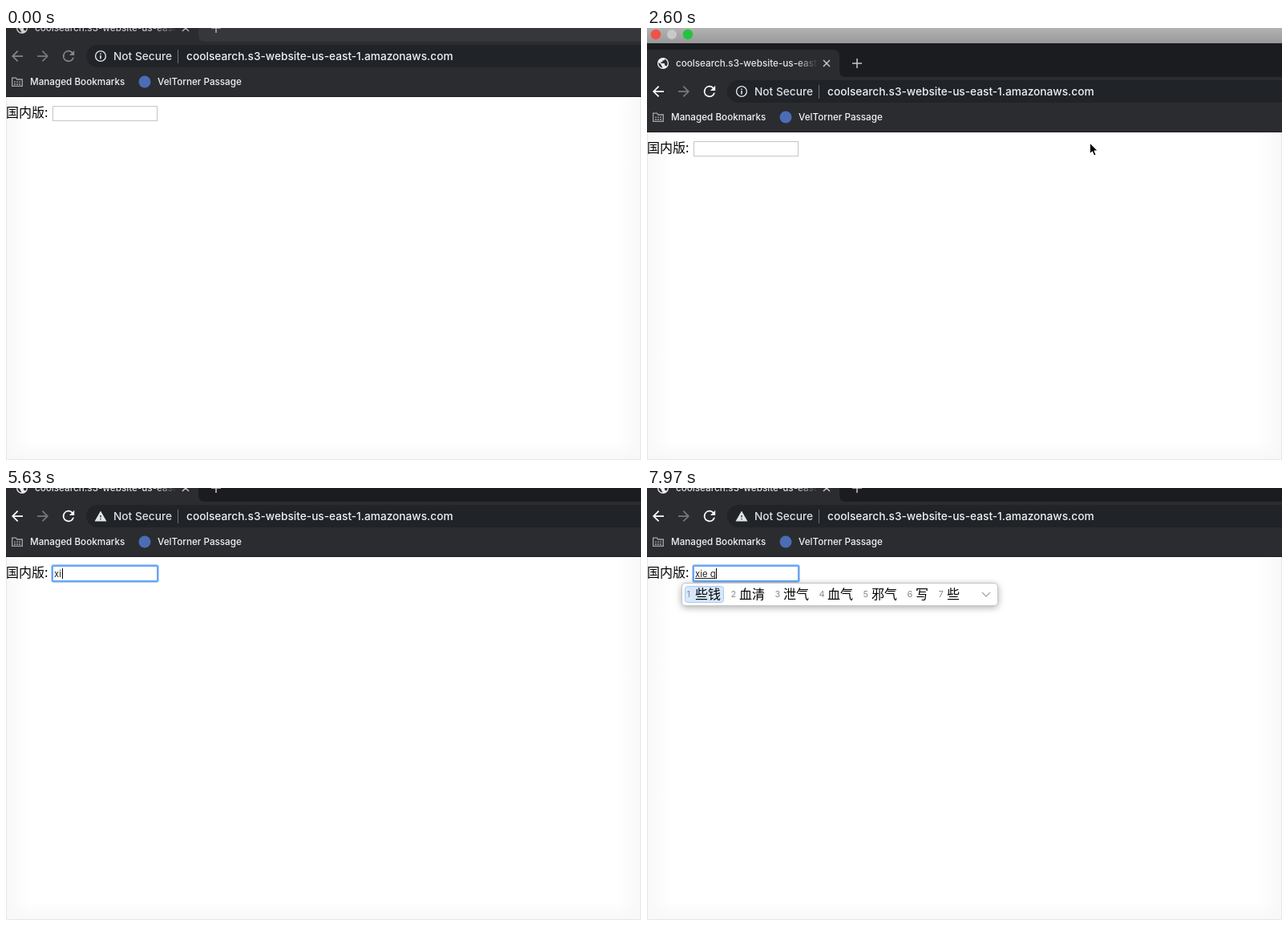
Recreate the animation shown at these times as an HTML page. Size 792 by 538 pixels, loop 8 s.

```html
<!DOCTYPE html>
<html lang="zh-CN">
<head>
<meta charset="utf-8">
<title>Search</title>
<style>
html, body { margin: 0; width: 100%; height: 100%; overflow: hidden; background: #fff; }
svg { display: block; width: 792px; height: 538px; }
text { font-family: Inter, Roboto, sans-serif; white-space: pre; }
.cjk { font-family: "Noto Sans CJK SC", "Noto Sans CJK", sans-serif; font-size: 16px; font-weight: 500; }
.small { font-size: 11.7px; font-weight: 500; }
.url { font-size: 13.7px; font-weight: 500; }
.line { fill: none; stroke-linecap: butt; }
#popup { filter: drop-shadow(0 2px 4px rgba(0, 0, 0, .32)); }
</style>
</head>
<body>
<svg viewBox="0 0 792 538">
  <defs>
    <linearGradient id="bar" x2="0" y2="1">
      <stop stop-color="#b2b2b2"/><stop offset="1" stop-color="#999"/>
    </linearGradient>
    <linearGradient id="edge">
      <stop stop-color="#f8f8f8"/><stop offset="1" stop-color="#f8f8f8" stop-opacity="0"/>
    </linearGradient>
    <linearGradient id="fade" gradientUnits="userSpaceOnUse" x1="186" x2="213" y1="0" y2="0">
      <stop stop-color="#e4e5e8"/><stop offset="1" stop-color="#e4e5e8" stop-opacity="0"/>
    </linearGradient>
  </defs>

  <rect width="792" height="538" fill="#fff"/>
  <g fill="url(#edge)">
    <rect width="30" height="538"/>
    <rect width="30" height="538" transform="translate(792) scale(-1 1)"/>
    <rect width="24" height="792" transform="translate(0 538) rotate(-90)"/>
  </g>
  <path class="line" d="M.5 0V537.5H791.5V0" stroke="#e6e6e6"/>

  <g id="window">
    <text class="cjk" y="111">国内版:</text>
    <rect x="58.5" y="97.5" width="130" height="18" fill="#fff" stroke="#c6c6c6"/>
    <g id="ring" class="line">
      <rect x="57" y="96" width="133" height="21" rx="2.5" stroke="#a9cdfa" stroke-width="2"/>
      <rect x="58" y="97" width="131" height="19" rx="1" stroke="#69a7f3" stroke-width="2"/>
    </g>
    <text id="typed" x="60" y="111" font-size="11.3" fill="#222"></text>
    <path id="under" class="line" stroke="#222"/>
    <rect id="caret" y="100" width="1" height="13"/>

    <rect id="strip" y="-60" width="792" height="80"/>
    <path d="M-10 17V-17H232q8 0 8 8V9q0 8 8 8H792V86H0V17z" fill="#2b2c30"/>
    <rect y="85" width="792" height="1" fill="#1c1d20"/>
    <rect x="100" y="21" width="720" height="28" rx="14" fill="#202327"/>

    <g id="tab">
      <path transform="translate(11.6 -8.4) scale(.7)" fill="#f1f1f1" d="M12 2a10 10 0 1 0 0 20 10 10 0 0 0 0-20zm-1 17.93c-3.95-.49-7-3.85-7-7.93 0-.62.08-1.21.21-1.79L9 15v1c0 1.1.9 2 2 2zm6.9-2.54c-.26-.81-1-1.39-1.9-1.39h-1v-3c0-.55-.45-1-1-1H8v-2h2c.55 0 1-.45 1-1V7h2c1.1 0 2-.9 2-2v-.41c2.93 1.19 5 4.06 5 7.41 0 2.08-.8 3.97-2.1 5.39z"/>
      <text class="small" x="36" y="4" fill="url(#fade)">coolsearch.s3-website-us-east</text>
      <path class="line" d="M220-4l8 8m0-8l-8 8M256 0h12M262-6V6" stroke="#c6c7ca" stroke-width="1.5"/>
    </g>

    <path class="nav" transform="translate(3.5 24.5) scale(.875)" d="M20 11H7.83l5.59-5.59L12 4l-8 8 8 8 1.41-1.41L7.83 13H20z"/>
    <path transform="translate(56.5 24.5) scale(-.875 .875)" fill="#77787c" d="M20 11H7.83l5.59-5.59L12 4l-8 8 8 8 1.41-1.41L7.83 13H20z"/>
    <path class="nav" transform="translate(67.2 24.2) scale(.9)" d="M17.65 6.35A8 8 0 1 0 19.73 14h-2.08A6 6 0 1 1 12 6c1.66 0 3.14.69 4.22 1.78L13 11h7V4z"/>

    <g id="info">
      <circle class="line" cx="118" cy="35" r="6.4" stroke="#e3e4e6" stroke-width="1.4"/>
      <path d="M117.2 34h1.6v4.5h-1.6zM117.2 31.4h1.6V33h-1.6z" fill="#e3e4e6"/>
    </g>
    <path id="warn" transform="translate(109.84 27.1) scale(.68)" fill="#e3e4e6" d="M1 21h22L12 2zm12-3h-2v-2h2zm0-4h-2v-4h2z"/>
    <text class="url" x="134" y="40" fill="#e0e1e4">Not Secure</text>
    <path class="line" d="M214.5 27V44" stroke="#717276"/>
    <text class="url" x="225" y="40" fill="#f1f2f4">coolsearch.s3-website-us-east-1.amazonaws.com</text>

    <g class="line" stroke="#a4a5a9" stroke-width="1.3">
      <path d="M7.7 72.3V62.2h4.6l1.5 1.8h6.5v8.3z"/>
      <path d="M10 67.2h8M10 70h8" stroke-dasharray="2 1"/>
    </g>
    <text class="small" x="30" y="71" fill="#f1f2f4">Managed Bookmarks</text>
    <circle cx="173" cy="67" r="7.5" fill="#4a6db5"/>
    <text class="small" x="189" y="71" fill="#f1f2f4">VelTorner Passage</text>
  </g>

  <g id="popup">
    <rect id="panel" x="43.5" y="118.5" height="28" rx="4.5" fill="#fff" stroke="#c4c4c4"/>
    <rect id="pick" x="47.5" y="122.5" height="20" rx="3" fill="#d7e8fc" stroke="#a9caf2"/>
    <g id="items"></g>
    <path id="chevron" class="line" d="M-5-2L0 3 5-2" stroke="#aaa" stroke-width="1.4"/>
  </g>

  <g id="title">
    <rect width="792" height="19" fill="url(#bar)"/>
    <circle cx="11" cy="8" r="6.2" fill="#f15147"/>
    <circle cx="31" cy="8" r="6" fill="#c9c9c9"/>
    <circle cx="51" cy="8" r="6.2" fill="#21c43c"/>
  </g>

  <path id="arrow" d="M0 0V13.6l3.1-2.9 2.2 5.2 2.4-1-2.2-5.1H9.8z" fill="#000" stroke="#fff" stroke-width="1"/>
  <g id="beam" class="line">
    <path d="M-3.5-7.5Q0-7.5 0-5.5 0-7.5 3.5-7.5M0-6V6.5M-3.5 8Q0 8 0 6 0 8 3.5 8M-2 3.5H2" stroke="#fff" stroke-width="2.4" opacity=".7"/>
    <path d="M-3.5-7.5Q0-7.5 0-5.5 0-7.5 3.5-7.5M0-6V6.5M-3.5 8Q0 8 0 6 0 8 3.5 8M-2 3.5H2" stroke="#111" stroke-width="1.1"/>
  </g>
</svg>

<script>
const LOOP = 8000;
const ACTIVE = 2000, FOCUS = 3500, FIRST_KEY = 4850;

// [time, text, input-method candidates]
const keys = [
  [FOCUS, ''], [FIRST_KEY, 'x'], [5200, 'xi'], [6100, 'x'], [6300, ''],
  [7050, 'x', '想 下 小 新 行 学 线'],
  [7220, 'xi', '系 洗 西 喜 细 戏 习'],
  [7400, 'xie', '写 些 谢谢 鞋 血 谢 斜'],
  [7700, 'xie q', '些钱 血清 泄气 血气 邪气 写 些']
];
const mouse = [
  [1750, 560, -20], [2000, 560, 48], [2250, 560, 48], [2500, 554, 138],
  [2600, 553, 143], [2800, 420, 166], [3050, 200, 146], [3250, 122.5, 112]
];

const $ = id => document.getElementById(id);
const set = (el, attrs) => { for (const k in attrs) el.setAttribute(k, attrs[k]); };
const show = (id, on) => set($(id), { visibility: on ? 'visible' : 'hidden' });
const move = (id, x, y) => set($(id), { transform: `translate(${x} ${y})` });
const ramp = (t, a, b) => Math.min(1, Math.max(0, (t - a) / (b - a)));
const ease = p => p * p * (3 - 2 * p);

function mouseAt(t) {
  let i = 0;
  while (i < mouse.length - 2 && t > mouse[i + 1][0]) i++;
  const [t0, x0, y0] = mouse[i], [t1, x1, y1] = mouse[i + 1];
  const p = ramp(t, t0, t1);
  return [x0 + (x1 - x0) * p, y0 + (y1 - y0) * p];
}

let shown = null;
function fillPopup(list) {
  if (list === shown) return;
  shown = list;
  let x = 50, html = '';
  list.split(' ').forEach((word, i) => {
    html += `<text x="${x - .5}" y="136" font-size="11" fill="#8b8b8b">${i + 1}</text>` +
            `<text class="cjk" x="${x + 10}" y="138">${word}</text>`;
    if (!i) set($('pick'), { width: 16 + 16 * word.length });
    x += 23 + 16 * word.length;
  });
  $('items').innerHTML = html;
  set($('panel'), { width: x - 9 });
  move('chevron', x + 20, 132);
}

function draw(t) {
  const hide = ease(ramp(t, 2760, 2960));
  const shift = 44 * ramp(t, 1625, 1670) * (1 - hide);
  const drop = ease(ramp(t, 1400, 1590)) * (1 - hide);
  move('window', 0, Math.round(shift));
  move('title', 0, Math.round(19 * drop - 19));
  show('title', drop > 0);

  const active = t >= ACTIVE;
  set($('strip'), { fill: active ? '#1b1c20' : '#36373b' });
  set($('tab'), { opacity: active ? 1 : .85 });
  document.querySelectorAll('.nav').forEach(n => set(n, { fill: active ? '#fff' : '#85868a' }));

  const warned = t >= FIRST_KEY;
  show('info', !warned);
  show('warn', warned);

  const focused = t >= FOCUS;
  const [since, text, list] = keys.filter(k => k[0] <= t).pop() || [0, ''];
  show('ring', focused);
  $('typed').textContent = text;
  const end = 60 + (text ? $('typed').getComputedTextLength() : 0);
  show('caret', focused && (t - since) % 1060 < 520);
  set($('caret'), { x: Math.round(end + .6) });
  set($('under'), { d: list ? `M60 112.5H${end}` : '' });

  show('popup', !!list);
  if (list) fillPopup(list);

  const [x, y] = mouseAt(t);
  const over = t >= 3200;
  show('arrow', t >= mouse[0][0] && !over);
  show('beam', over && !warned);
  move('arrow', x, y);
  move('beam', x, y);
}

function tick() {
  draw(performance.now() % LOOP);
  requestAnimationFrame(tick);
}
tick();
</script>
</body>
</html>
```
